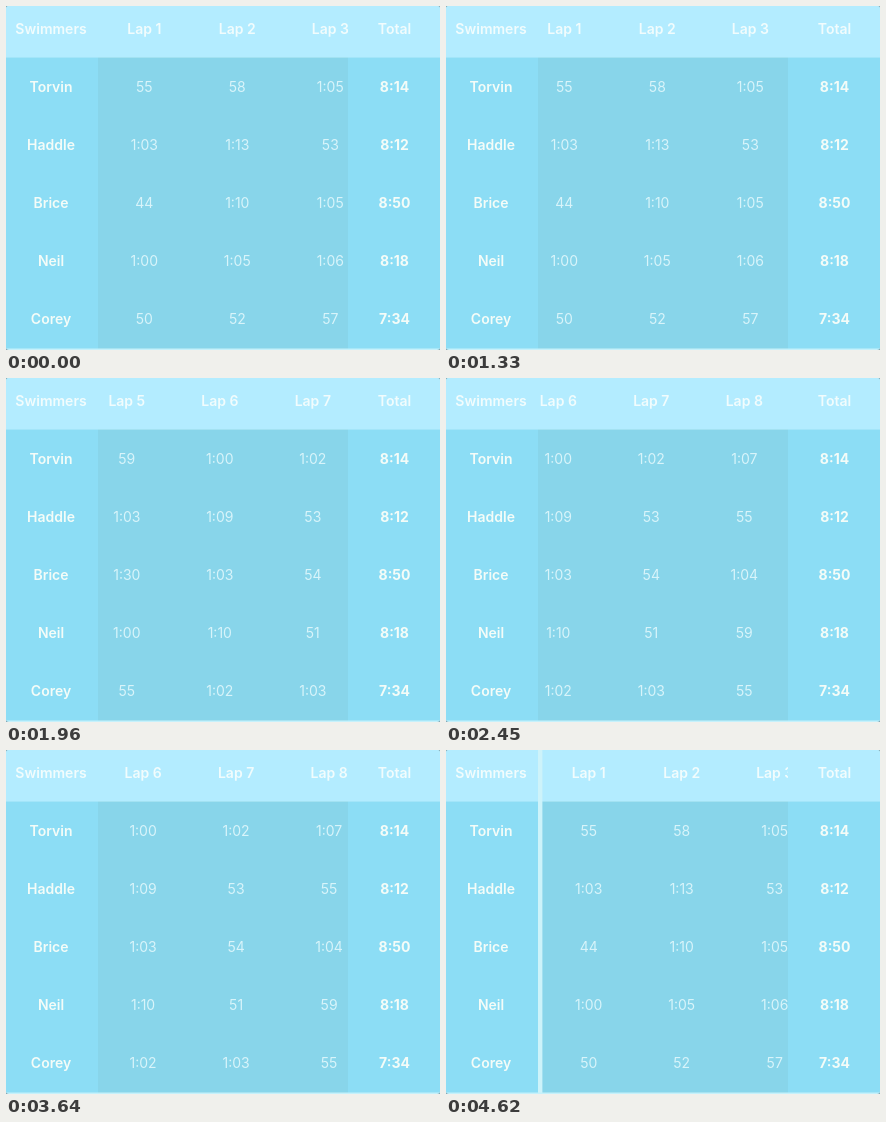
An HTML page with a canvas that plays this animation: 434x344 px, repeating every 4.69 s.

```html
<!DOCTYPE html>
<html lang="en">
<head>
<meta charset="utf-8">
<title>Swimmers</title>
<style>
html, body { margin: 0; width: 100%; height: 100%; overflow: hidden; background: #b9eefb; }
canvas { display: block; }
</style>
</head>
<body>
<canvas id="stage" width="434" height="344"></canvas>
<script>
const ctx = document.getElementById('stage').getContext('2d');
const W = 434, H = 344, LOOP = 4690, STEP = 70;
const LEFT = 92, RIGHT = 342, HEADER = 51.5, BOTTOM = 342.5;
const COLUMN = 93, LAPS = 8, MAX_SCROLL = LAPS * COLUMN - (RIGHT - LEFT);

const rows = [
  { name: 'Torvin', laps: '55 58 1:05 1:08 59 1:00 1:02 1:07', total: '8:14' },
  { name: 'Haddle', laps: '1:03 1:13 53 1:03 1:03 1:09 53 55', total: '8:12' },
  { name: 'Brice', laps: '44 1:10 1:05 1:20 1:30 1:03 54 1:04', total: '8:50' },
  { name: 'Neil', laps: '1:00 1:05 1:06 1:07 1:00 1:10 51 59', total: '8:18' },
  { name: 'Corey', laps: '50 52 57 1:00 55 1:02 1:03 55', total: '7:34' }
].map(row => ({ ...row, laps: row.laps.split(' ') }));

// Friction after a flick: approaches `end`, passing through `at` at `time`.
const glide = (t, end, at, time) => end + (at - end) * Math.exp((time - t) / 500);

// Critically damped return from beyond the edge.
const bounce = (t, speed) => speed * t * Math.exp(-t / 90);

// Finger drag that gathers speed.
const drag = (t, distance, duration) => distance * Math.pow(t / duration, 2.45);

function scrollAt(t) {
  if (t < 1190) return 0;
  if (t < 1400) return drag(t - 1190, 54, 210);
  if (t < 2475) return glide(t, 552, 389.5, 1960);
  if (t < 3200) return MAX_SCROLL + bounce(t - 2475, 0.116);
  if (t < 3500) return MAX_SCROLL;
  if (t < 3710) return MAX_SCROLL - drag(t - 3500, 75, 210);
  if (t < 4353) return glide(t, -160, 171, 3990);
  return -bounce(t - 4353, 0.32);
}

function box(color, x0, y0, x1, y1) {
  ctx.fillStyle = color;
  ctx.fillRect(x0, y0, x1 - x0, y1 - y0);
}

function label(text, x, middle, weight, color) {
  ctx.font = `${weight} 14px Inter, sans-serif`;
  ctx.fillStyle = color;
  ctx.fillText(text, x, middle + 5);
}

function clipped(x, y, w, h, paint) {
  ctx.save();
  ctx.beginPath();
  ctx.rect(x, y, w, h);
  ctx.clip();
  paint();
  ctx.restore();
}

const rowMiddle = i => 81 + 58 * i;

function drawLaps(scroll) {
  const start = LEFT + Math.max(0, -scroll);
  const end = RIGHT - Math.max(0, scroll - MAX_SCROLL);
  box('#cdf3fa', LEFT, 0, RIGHT, BOTTOM);
  box('#b3ecff', start, 0, end, HEADER);
  box('#88d5ea', start, HEADER, end, BOTTOM);

  const center = lap => 138.3 + lap * COLUMN - scroll;
  clipped(90, 0, RIGHT - 90, HEADER, () => {
    for (let lap = 0; lap < LAPS; lap++) {
      label(`Lap ${lap + 1}`, center(lap), 22.5, 600, '#f1fcfd');
    }
  });
  clipped(LEFT, HEADER, RIGHT - LEFT, H, () => {
    rows.forEach((row, i) => row.laps.forEach((time, lap) => {
      label(time, center(lap), rowMiddle(i), 400, '#d8f4fa');
    }));
  });
}

function draw(scroll) {
  ctx.textAlign = 'center';
  box('#7fa3af', 0, 0, W, H);
  ctx.save();
  ctx.beginPath();
  ctx.roundRect(0, 0, W, H, 3);
  ctx.clip();

  box('#c6f1fb', 0, 0, W, H);
  box('#b3ecff', 0, 0, W, HEADER);
  box('#8cddf5', 0, HEADER, LEFT, BOTTOM);
  box('#8cddf5', RIGHT, HEADER, W, BOTTOM);
  drawLaps(scroll);

  label('Swimmers', 45, 22.5, 600, '#f1fcfd');
  label('Total', 388.5, 22.5, 600, '#f1fcfd');
  rows.forEach((row, i) => {
    label(row.name, 45, rowMiddle(i), 600, '#f4fcf8');
    label(row.total, 388.5, rowMiddle(i), 700, '#f4fcf8');
  });
  ctx.restore();
}

let origin;
function frame(now) {
  origin ??= now;
  const t = (now - origin) % LOOP;
  draw(scrollAt(Math.floor(t / STEP) * STEP));
  requestAnimationFrame(frame);
}
requestAnimationFrame(frame);
</script>
</body>
</html>
```
